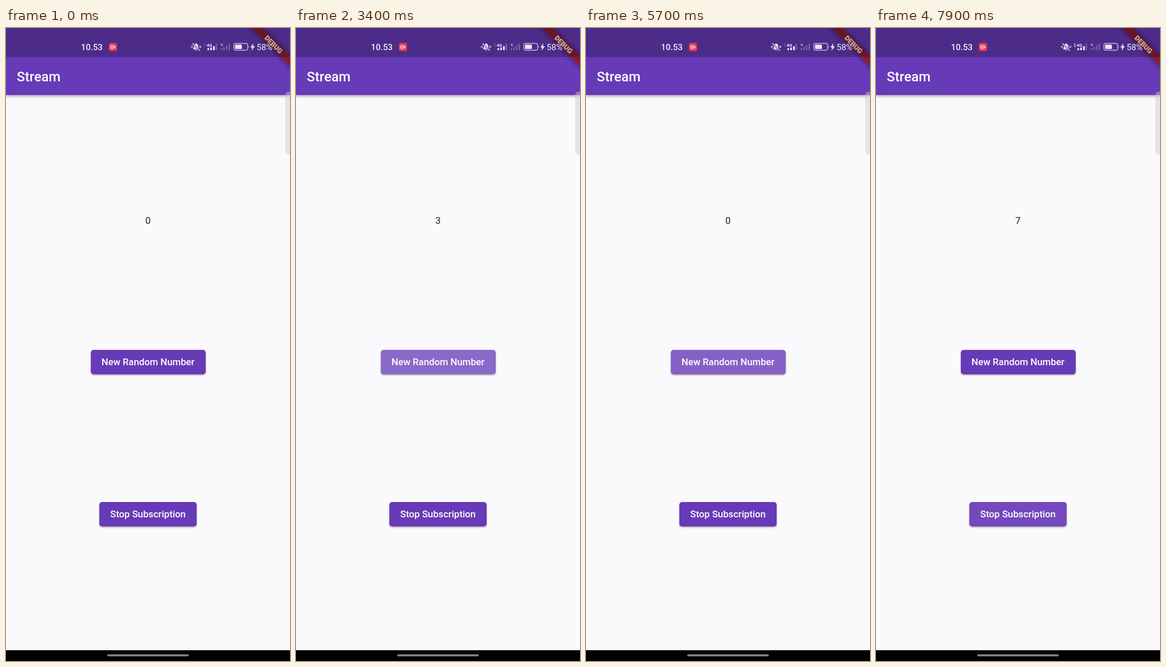
Animation of 502x1115 px, one loop 8000 ms. Source, as an HTML page:

```html
<!DOCTYPE html>
<html lang="en">
<head>
<meta charset="utf-8">
<title>Stream</title>
<style>
  html, body { margin: 0; width: 100%; height: 100%; overflow: hidden; background: #fafafc; }
  body { position: relative; font-family: Roboto, sans-serif; }
  body > *, .ripple, .label { position: absolute; }
  .appbar { left: 0; top: 0; width: 502px; height: 118px; background: #673ab7; box-shadow: 0 2px 5px rgba(0,0,0,.38); }
  svg { left: 0; top: 0; }
  .number { left: 0; width: 502px; top: 327px; line-height: 24px; font-size: 16.8px; text-align: center; color: #212121; }
  .button { height: 43px; border-radius: 5px; background: #673ab7; }
  .clip { position: absolute; inset: 0; overflow: hidden; border-radius: 5px; }
  .label { inset: 0; line-height: 43px; text-align: center; white-space: nowrap; color: #fff; font-size: 16.8px; font-weight: 500; }
  .ripple { border-radius: 50%; background: #fff; }
  .touch {
    width: 24px; height: 24px; margin: -14px; border-radius: 50%;
    border: 2px solid rgba(115,105,145,.3);
    background: radial-gradient(rgba(255,255,255,.62), rgba(255,255,255,.48));
    background-clip: padding-box;
  }
  #random { left: 149.5px; top: 566.5px; width: 203px; }
  #stop { left: 165px; top: 835px; width: 172px; }
</style>
</head>
<body>
<div class="appbar"></div>
<div class="number" id="number">0</div>
<div class="button" id="random"><div class="clip"></div><div class="label">New Random Number</div></div>
<div class="button" id="stop"><div class="clip"></div><div class="label">Stop Subscription</div></div>

<svg width="502" height="1115" viewBox="0 0 502 1115" font-family="Roboto, sans-serif" fill="#fff">
  <defs><filter id="blur" x="-50%" y="-200%" width="200%" height="500%"><feGaussianBlur stdDeviation="4"/></filter></defs>
  <text x="19" y="93.5" font-size="24" font-weight="500">Stream</text>

  <g transform="translate(502 0) rotate(45)">
    <rect x="-70" y="34" width="140" height="14" fill="#000" opacity=".5" filter="url(#blur)"/>
    <rect x="-70" y="34" width="140" height="14" fill="#b71c1c" opacity=".63"/>
    <text y="45.4" font-size="12.2" font-weight="900" text-anchor="middle" opacity=".95">DEBUG</text>
  </g>
  <rect width="502" height="51" fill="#000" opacity=".25"/>

  <g font-size="15" font-weight="500" fill="#f3eff8">
    <text x="132.5" y="39">10.53</text>
    <text x="443" y="39" font-weight="400">58%</text>
  </g>

  <rect x="182" y="26.5" width="14" height="14" rx="3" fill="#ea4055"/>
  <g fill="none" stroke="#fff">
    <rect x="185" y="31" width="5.5" height="5" rx="1"/>
    <path d="M190.5 33.5L193 31.7V35.3Z" stroke-width=".8"/>
  </g>
  <circle cx="187.7" cy="33.5" r="1"/>

  <g fill="#ece6f5">
    <path d="M330.5 37.5C332.3 36 331.5 31.5 333 29.5C334 28 335 28 336 26.8C337 28 338 28 339 29.5C340.5 31.5 339.7 36 341.5 37.5ZM334 38.5H338Q336 41 334 38.5Z"/>
    <path d="M329.5 27L342.5 40" stroke="#4d2c89" stroke-width="3"/>
    <path d="M329.5 27L342.5 40M329 31V35.5M343 31V35.5" stroke="#ece6f5" stroke-width="1.3"/>
    <circle cx="327" cy="33.3" r=".8"/><circle cx="345" cy="33.3" r=".8"/>
    <path id="arrows" d="M349.5 29.4L351.5 27L353.5 29.4ZM349.5 31.4L351.5 33.8L353.5 31.4Z"/>
    <text x="354.5" y="33" font-size="8" font-weight="700">4G</text>
    <path d="M356 35.5h3V39h-3zM361 34.5h3V39h-3zM366 32h3V39h-3z"/>
    <path d="M370.5 27.5h2.5V39h-2.5zM379.5 35.5h2.5V39h-2.5zM384 33.5h2.5V39H384zM388.7 30.5h2.5V39h-2.5zM393.5 27.5h2.5V39h-2.5z" opacity=".28"/>
    <path d="M379.7 27.7L383.3 31.5M383.3 27.7L379.7 31.5" stroke="#ece6f5"/>
    <rect x="402.7" y="27.2" width="24.6" height="12" rx="3.5" fill="none" stroke="#d8cdea" stroke-width="1.2"/>
    <rect x="404.8" y="29.3" width="12.2" height="7.8" rx="1.7"/>
    <path d="M428.4 31.2Q430 33.2 428.4 35.2Z"/>
    <path d="M437.3 26.8L432 34.2H435.2L434 40L440 32.3H436.5Z"/>
  </g>

  <path d="M502 112H500Q493.5 112 493.5 119V216Q493.5 223 500 223H502Z" fill="#c8c8cc" opacity=".45"/>
  <rect y="1096" width="502" height="19" fill="#000"/>
  <rect x="179" y="1103.3" width="144" height="3.4" rx="1.7" fill="#858585"/>
</svg>

<script>
const LOOP = 8000, INK = 0.24;
const $ = id => document.getElementById(id);
const clamp = v => Math.min(1, Math.max(0, v));
const mix = (a, b, k) => a + (b - a) * k;

// cubic-bezier(.25, .1, .25, 1)
function ease(x) {
  const bezier = (u, a, b) => 3 * (1 - u) ** 2 * u * a + 3 * (1 - u) * u * u * b + u ** 3;
  let lo = 0, hi = 1;
  for (let i = 0; i < 16; i++) {
    const mid = (lo + hi) / 2;
    if (bezier(mid, .25, .25) < x) lo = mid; else hi = mid;
  }
  return bezier(lo, .1, 1);
}

const buttons = {
  random: { x: 149.5, y: 566.5, w: 203, h: 43 },
  stop: { x: 165, y: 835, w: 172, h: 43 }
};

// button, press time, release time, x, y, number shown after release
const taps = [
  ['random', 1880, 2190, 172.5, 582.5, 1],
  ['random', 2420, 2705, 159, 595, 3],
  ['random', 3050, 3250, 165, 600, 3],
  ['random', 3550, 3760, 168, 602, 3],
  ['random', 4190, 4575, 171, 605, 2],
  ['random', 4725, 4925, 175, 612, 0],
  ['random', 5410, 5450, 172, 608, 0],
  ['random', 5880, 6200, 174, 604, 7],
  ['stop', 7450, 7575, 200, 861, 7]
].map(([name, press, release, x, y, value]) => ({
  name, press, release, x, y, value,
  start: Math.min(press + 100, release),
  ripple: addDiv('ripple', $(name).firstChild),
  touch: addDiv('touch', document.body)
}));

function addDiv(className, parent) {
  const div = document.createElement('div');
  div.className = className;
  return parent.appendChild(div);
}

function drawTap(tap, t) {
  const { x, y, w, h } = buttons[tap.name];
  const held = Math.min(t, tap.release) - tap.start;
  const since = Math.max(0, t - tap.release);
  const k = ease(clamp(held / 1000 + since / 225));
  const full = Math.hypot(w, h) / 2;
  const r = mix(full * .3, full + 6, k);
  const alpha = clamp((t - tap.start) / 75) * (1 - clamp((since - 225) / 150));
  Object.assign(tap.ripple.style, {
    width: 2 * r + 'px', height: 2 * r + 'px',
    left: mix(tap.x - x, w / 2, k) - r + 'px',
    top: mix(tap.y - y, h / 2, k) - r + 'px',
    opacity: INK * alpha
  });
  Object.assign(tap.touch.style, {
    left: tap.x + 'px', top: tap.y + 'px',
    opacity: t < tap.press ? 0 : 1 - clamp(since / 100)
  });
  return clamp(clamp(held / 200) - since / 200);
}

function draw(t) {
  const lift = { random: 0, stop: 0 };
  let value = 0;
  for (const tap of taps) {
    lift[tap.name] = Math.max(lift[tap.name], drawTap(tap, t));
    if (t >= tap.release) value = tap.value;
  }
  for (const name in lift) {
    const e = lift[name];
    $(name).style.boxShadow = `0 ${1.5 + 3 * e}px ${3 + 4 * e}px rgba(0,0,0,.36)`;
  }
  $('number').textContent = value;
  const online = (t >= 1100 && t < 1200) || t >= 7200;
  $('arrows').setAttribute('opacity', online ? 1 : .25);
}

function tick(now) {
  draw(now % LOOP);
  requestAnimationFrame(tick);
}
draw(0);
requestAnimationFrame(tick);
</script>
</body>
</html>
```
